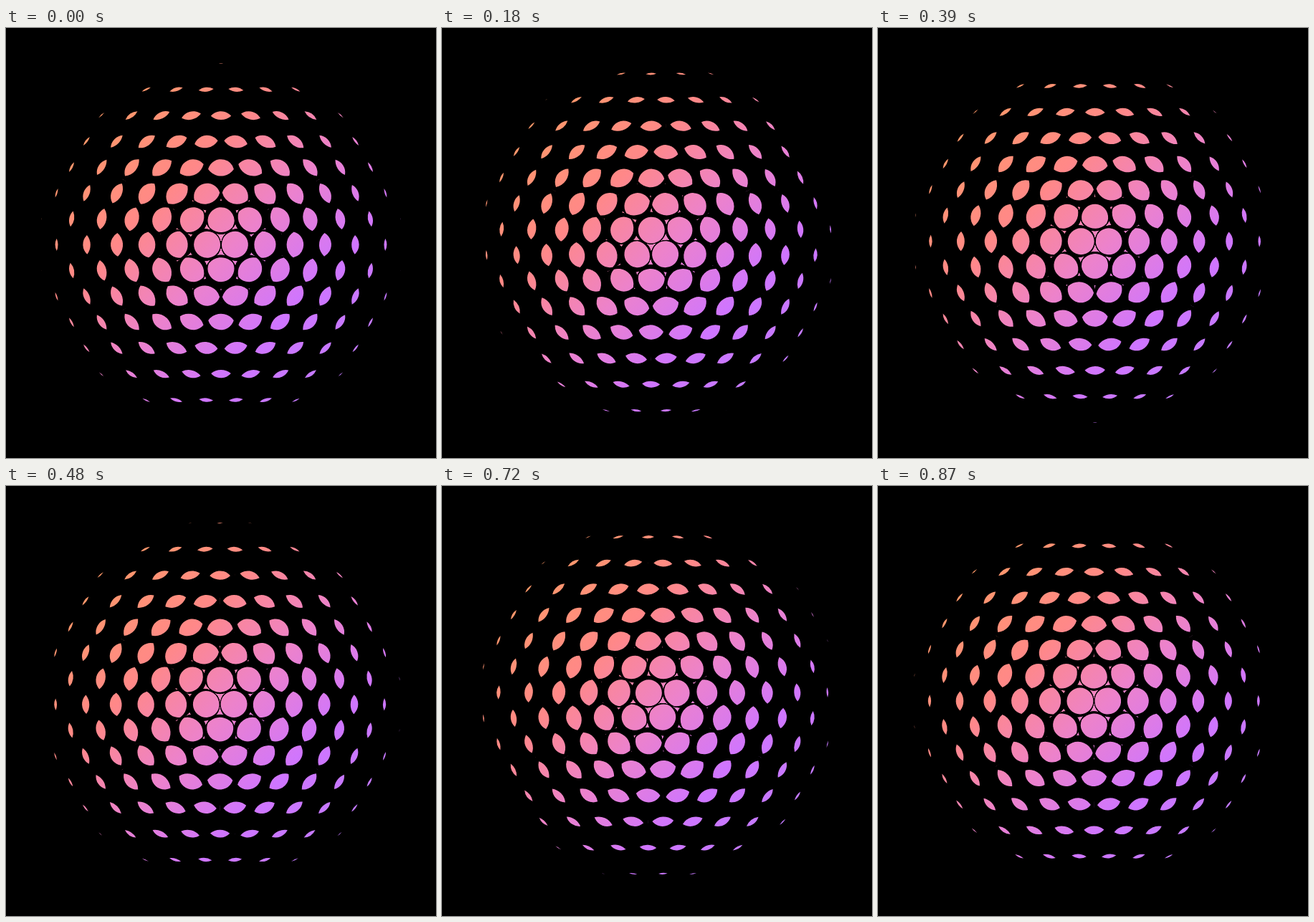
An HTML page with a canvas that plays this animation: 600x600 px, repeating every 900 ms.

```html
<!DOCTYPE html>
<html>
<head>
<meta charset="utf-8">
<style>
html, body { margin: 0; width: 100%; height: 100%; overflow: hidden; background: #000; }
canvas { display: block; width: 600px; height: 600px; }
</style>
</head>
<body>
<canvas id="stage" width="600" height="600"></canvas>
<script>
const ctx = document.getElementById('stage').getContext('2d');
const ROW = Math.sqrt(3) / 2;
const NEAR = 45.3, FAR = 38.7;   // lattice spacing at both ends of the tubes
const BORE = 0.478, SHELL = 0.496;   // tube radii per unit of spacing
const LAYERS = 16;
const STEP = 30, STEPS = 15;
const TAU = Math.PI * 2;

// Hexagonal lattice, one unit apart
const lattice = [];
for (let j = -9; j <= 9; j++) {
  for (let i = -9; i <= 9; i++) lattice.push([i + (j % 2 ? 0 : 0.5), j * ROW]);
}

const shells = new Path2D();
for (const [x, y] of lattice) {
  shells.moveTo(x + SHELL, y);
  shells.arc(x, y, SHELL, 0, TAU);
}

const colors = ctx.createLinearGradient(0, 0, 600, 600);
[[0.2, '#ff9a66'], [0.38, '#ff8888'], [0.52, '#ec82cc'], [0.66, '#cf75ff'], [0.85, '#bd7dff']]
  .forEach(([at, color]) => colors.addColorStop(at, color));

// Overlap of the far and near openings of the tube at lattice point x, y
function addLens(x, y) {
  const a = BORE * FAR, b = BORE * NEAR;
  const d = Math.hypot(x, y) * (NEAR - FAR);
  if (d >= a + b) return;
  const ax = 300 + x * FAR, ay = 300 + y * FAR;
  const dir = Math.atan2(y, x);
  if (d <= b - a) {
    ctx.moveTo(ax + a, ay);
    ctx.arc(ax, ay, a, 0, TAU);
    return;
  }
  const alpha = Math.acos((d * d + a * a - b * b) / (2 * d * a));
  const beta = Math.acos((d * d + b * b - a * a) / (2 * d * b));
  const back = dir + Math.PI;
  ctx.moveTo(ax + a * Math.cos(dir - alpha), ay + a * Math.sin(dir - alpha));
  ctx.arc(ax, ay, a, dir - alpha, dir + alpha);
  ctx.arc(300 + x * NEAR, 300 + y * NEAR, b, back - beta, back + beta);
  ctx.closePath();
}

function draw(step) {
  const shift = ((step + 1) % STEPS) / STEPS;
  const dx = 1 / 30 - shift / 2, dy = shift * ROW;

  ctx.fillStyle = '#000';
  ctx.fillRect(0, 0, 600, 600);

  // Gaps between the tubes
  ctx.fillStyle = colors;
  ctx.beginPath();
  ctx.arc(300, 300, 200, 0, TAU);
  ctx.fill();
  ctx.fillStyle = '#000';
  for (let n = 0; n < LAYERS; n++) {
    const scale = FAR + (NEAR - FAR) * n / (LAYERS - 1);
    ctx.setTransform(scale, 0, 0, scale, 300 + dx * scale, 300 + dy * scale);
    ctx.fill(shells);
  }
  ctx.resetTransform();

  // Light through the tubes
  ctx.fillStyle = colors;
  ctx.beginPath();
  for (const [x, y] of lattice) addLens(x + dx, y + dy);
  ctx.fill();
}

let last = -1;
function tick() {
  const step = Math.floor(performance.now() / STEP) % STEPS;
  if (step !== last) draw(last = step);
  requestAnimationFrame(tick);
}
tick();
</script>
</body>
</html>
```
